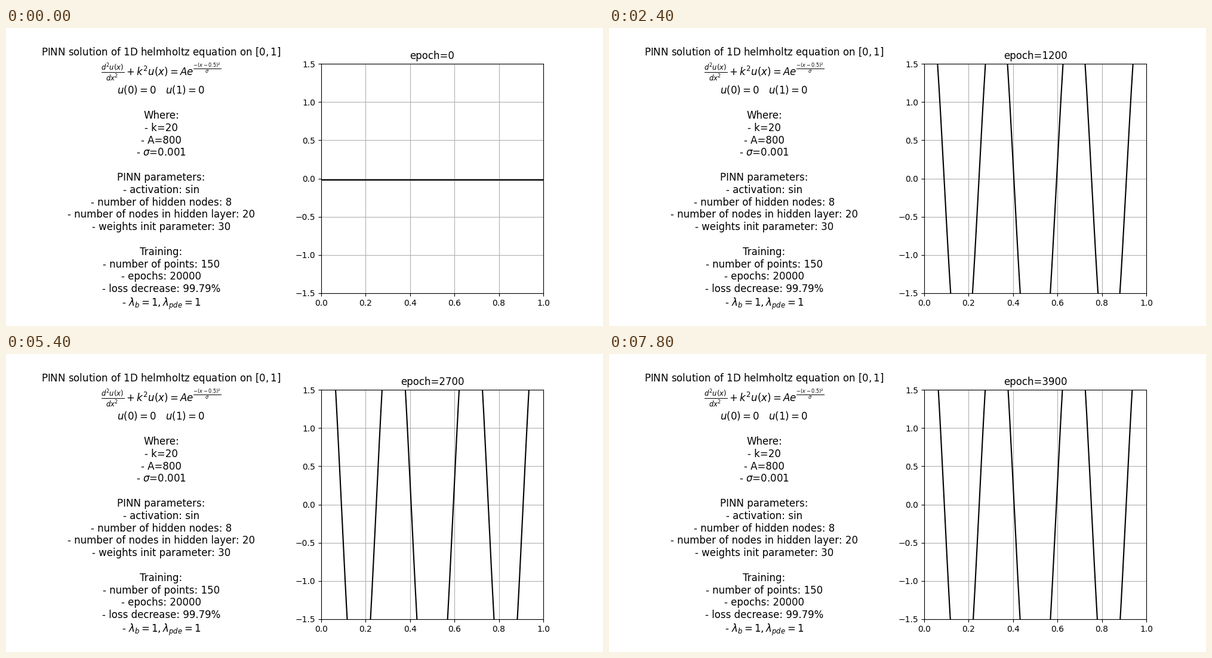
A matplotlib script that plays this animation: 1000x500 px, repeating every 8 s.

```python
import numpy as np
import matplotlib.pyplot as plt
from matplotlib.animation import FuncAnimation

FRAMES, INTERVAL = 40, 200
K = 20

NOTES = "\n".join([
    r"PINN solution of 1D helmholtz equation on $[0, 1]$",
    r"$\frac{d^2u(x)}{dx^2} + k^2u(x) = Ae^{\frac{-(x-0.5)^2}{\sigma}}$",
    r"$u(0)=0 \quad u(1)=0$",
    "",
    "Where:",
    "- k=20",
    "- A=800",
    r"- $\sigma$=0.001",
    "",
    "PINN parameters:",
    "- activation: sin",
    "- number of hidden nodes: 8",
    "- number of nodes in hidden layer: 20",
    "- weights init parameter: 30",
    "",
    "Training:",
    "- number of points: 150",
    "- epochs: 20000",
    "- loss decrease: 99.79%",
    r"- $\lambda_b=1, \lambda_{pde}=1$",
])

# Amplitude and phase of the wave as training goes on
STEPS = [0, 6, 8, 12, 16, 22, 27, 34, 39]
AMPLITUDE = [0, 1.92, 2.47, 2.73, 3.0, 3.02, 3.01, 2.98, 2.92]
PHASE = [0.02, 0.13, 0.172, 0.22, 0.25, 0.247, 0.246, 0.243, 0.24]

BOTTOM, HEIGHT = 0.11, 0.77

fig = plt.figure(figsize=(10, 5), dpi=100)
fig.text(0.26, BOTTOM + HEIGHT / 2, NOTES, fontsize=12,
         ha="center", va="center")

ax = fig.add_axes([0.528, BOTTOM, 0.372, HEIGHT])
ax.set_xlim(0, 1)
ax.set_ylim(-1.5, 1.5)
ax.grid(True)
title = ax.set_title("epoch=0")

x = np.linspace(0, 1, 150)
edge_distance = 0.5 - np.abs(x - 0.5)
line, = ax.plot(x, np.zeros_like(x), color="black", lw=1.5)


def solution(step):
    amplitude = np.interp(step, STEPS, AMPLITUDE)
    phase = np.interp(step, STEPS, PHASE)
    # Early on the wave is stronger near the centre
    tilt = 0.16 * max(0, 2 - step / 8)
    gain = 1 + tilt * (edge_distance - 0.25)
    offset = -0.0156 * max(0, 1 - step / 4)
    return amplitude * gain * np.cos(K * edge_distance - phase) + offset


def update(step):
    line.set_ydata(solution(step))
    title.set_text(f"epoch={100 * step}")
    return line, title


anim = FuncAnimation(fig, update, frames=FRAMES, interval=INTERVAL,
                     repeat=True, repeat_delay=0, blit=False)
plt.show()
```
